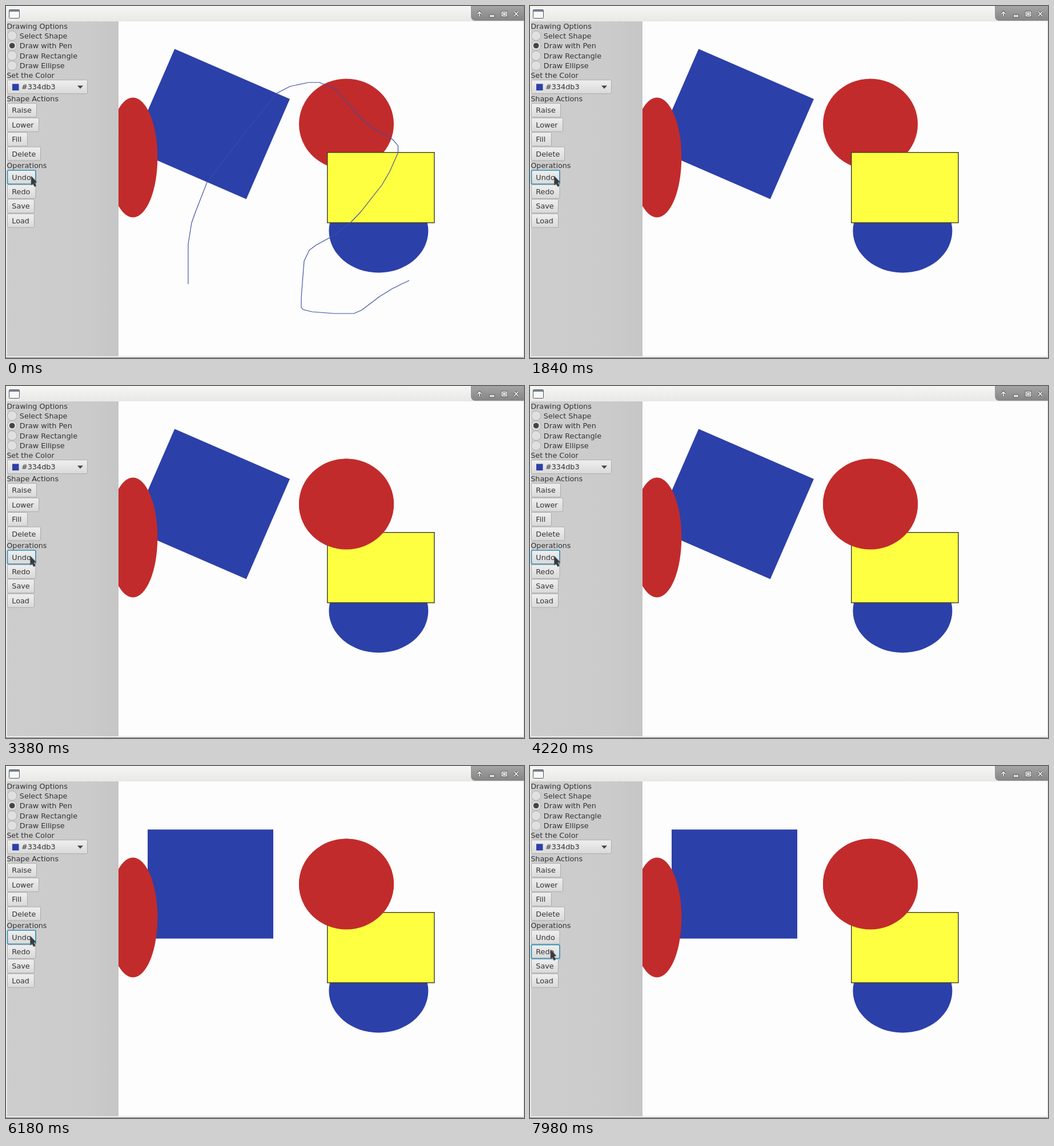
Write an HTML page that moves like this. It is 907x617 px and loops after 8 s.

```html
<!DOCTYPE html>
<html lang="en">
<head>
<meta charset="utf-8">
<title>Shape editor</title>
<style>
  html, body { margin: 0; width: 100%; height: 100%; overflow: hidden; background: #fdfdfd; }
  svg { display: block; width: 100%; height: 100%; }
  text { font: 12.8px "DejaVu Sans", sans-serif; fill: #333; white-space: pre; }
</style>
</head>
<body>
<svg viewBox="0 0 907 617">
  <defs>
    <linearGradient id="bar" x2="0" y2="1"><stop stop-color="#f6f6f5"/><stop offset="1" stop-color="#e8e8e6"/></linearGradient>
    <linearGradient id="side"><stop stop-color="#cdcdcd"/><stop offset=".7" stop-color="#cbcbcb"/><stop offset="1" stop-color="#c6c6c6"/></linearGradient>
    <linearGradient id="btn" x2="0" y2="1"><stop stop-color="#efefef"/><stop offset="1" stop-color="#d9d9d9"/></linearGradient>
    <linearGradient id="ctl" x2="0" y2="1"><stop stop-color="#a5a5a5"/><stop offset="1" stop-color="#858585"/></linearGradient>
    <clipPath id="area"><path d="M197 27H907V614H197Z"/></clipPath>
  </defs>
  <rect width="907" height="617" fill="#fdfdfd"/>

  <g clip-path="url(#area)">
    <rect id="square" x="248" y="111.3" width="220" height="191.2" fill="#2c40a9"/>
    <ellipse cx="222.3" cy="265.5" rx="43" ry="105" fill="#c22b2b"/>
    <ellipse cx="652.4" cy="394" rx="87" ry="73.5" fill="#2c40a9"/>
    <ellipse id="under" cx="596" cy="207" rx="83" ry="79.5" fill="#c22b2b"/>
    <rect x="562.7" y="256.7" width="187.3" height="123.2" fill="#ffff42" stroke="#3a3a28" stroke-width="1.4"/>
    <use id="over" href="#under"/>
    <polyline id="pen" fill="none" stroke="#3b4ea5" stroke-width="1.15" points="319,487.5 319,417 325,380 331,363 352,309
      420,220 474,153 497,141 530,134 549,134 578,146 600,173 622,198 645,216 664,225 678,235 686.5,245 686.5,257
      672,290 658,314 621,361 603,380 567,406 543,419 531,428 522,447 519,485 517,512 517,528 520,532
      536,536 575,539 609,539 622,533.5 640,520 653,510 677,495 684,492 693,487 698,485 706,481"/>
  </g>

  <rect width="907" height="27" fill="url(#bar)"/>
  <path d="M0 0V617M0 614.7H907" stroke="#eee" stroke-width="3"/>
  <path d="M0 616.5H907" stroke="#777"/>
  <path d="M906.5 27V617" stroke="#ddd"/>
  <rect x="1.7" y="27" width="195.3" height="587" fill="url(#side)"/>
  <rect x="5.5" y="6.5" width="18" height="15" rx="1" fill="#f8f8f8" stroke="#555"/>
  <path d="M6 8.5H23" stroke="#788797" stroke-width="3"/>
  <path d="M814.5 0H907V25.5H822Q814.5 25.5 814.5 18Z" fill="url(#ctl)" stroke="#999"/>
  <g id="icons" fill="none"></g>
  <g id="panel"></g>
  <path id="cursor" d="M0 0L10 10.7 6.2 11.7 9 17.2 6 18.8 3.3 13.4 0 16Z" fill="#3a3a3a" stroke="#666" stroke-width=".7"/>
</svg>
<script>
const $ = id => document.getElementById(id);
const LOOP = 8000;

const icon = 'M829 18V11M825.5 14 829 10.3 832.5 14M848 16.5H854V18.5H848ZM868.5 10.5H876.5V17.5H868.5ZM871 13H874V15H871ZM890 10 897 17.5M897 10 890 17.5';
$('icons').innerHTML = `<path d="${icon}" stroke="#555" stroke-width="3.4"/><path d="${icon}" stroke="#fff" stroke-width="1.6"/>`;

const label = (s, x, y) => `<text x="${x}" y="${y}">${s}</text>`;
const box = (x, y, w, h, id = '') =>
  `<rect ${id && `id="${id}"`} x="${x}" y="${y}" width="${w}" height="${h}" rx="2" fill="url(#btn)" stroke="#aaa"/>`;
const button = (s, right, mid) =>
  box(2.5, mid - 12, right - 3, 24, s) + label(s, 10.3, mid + 4.6);
const radio = (s, y, on) =>
  `<circle cx="10.7" cy="${y}" r="8.3" fill="#e0e0e0" stroke="#b0b0b0"/>` +
  (on ? `<circle cx="10.7" cy="${y}" r="4.8" fill="#444"/>` : '') + label(s, 23.8, y + 4.6);

$('panel').innerHTML = [
  label('Drawing Options', 1.2, 40),
  ...['Select Shape', 'Draw with Pen', 'Draw Rectangle', 'Draw Ellipse']
    .map((s, i) => radio(s, 52 + i * 17.5, i === 1)),
  label('Set the Color', 1.2, 126),
  box(2.5, 129.7, 140, 24),
  '<path d="M11 136.5H22.5V148H11Z" fill="#2c40a9"/><path d="M125 139.5H135L130 145Z" fill="#444"/>',
  label('#334db3', 27, 146.4),
  label('Shape Actions', 1.2, 167),
  ...[['Raise', 54], ['Lower', 58], ['Fill', 38], ['Delete', 61]]
    .map(([s, r], i) => button(s, r, 182.8 + i * 25.4)),
  label('Operations', 1.2, 284.2),
  ...[['Undo', 52.5], ['Redo', 52.5], ['Save', 50], ['Load', 50]]
    .map(([s, r], i) => button(s, r, 300 + i * 25.4))
].join('');

// Cursor tip: time, x, y
const path = [
  [0, 44, 298], [500, 44, 298], [800, 42.5, 298], [6450, 42.5, 298],
  [6800, 48, 331.5], [7000, 48, 331.5], [7450, 36, 322], [LOOP, 36, 322]
];

function tip(t) {
  const i = path.findIndex(p => p[0] > t);
  const [a, b] = [path[i - 1], path[i]];
  const u = (t - a[0]) / (b[0] - a[0]), k = u * u * (3 - 2 * u);
  return [a[1] + (b[1] - a[1]) * k, a[2] + (b[2] - a[2]) * k];
}

function focus(id, on) {
  $(id).setAttribute('stroke', on ? '#328fb9' : '#aaa');
  $(id).setAttribute('stroke-width', on ? 1.7 : 1);
}

const show = (id, on) => $(id).setAttribute('visibility', on ? 'visible' : 'hidden');

function draw(t) {
  show('pen', t < 840);
  show('over', t >= 2940);
  $('square').setAttribute('transform', `rotate(${t < 5040 ? 23.5 : 0} 358 206.9)`);
  focus('Undo', t < 7860);
  focus('Redo', t >= 7860);
  $('cursor').setAttribute('transform', `translate(${tip(t)})`);
}

const start = performance.now();
function tick(now) {
  draw(Math.max(0, now - start) % LOOP);
  requestAnimationFrame(tick);
}
draw(0);
requestAnimationFrame(tick);
</script>
</body>
</html>
```
